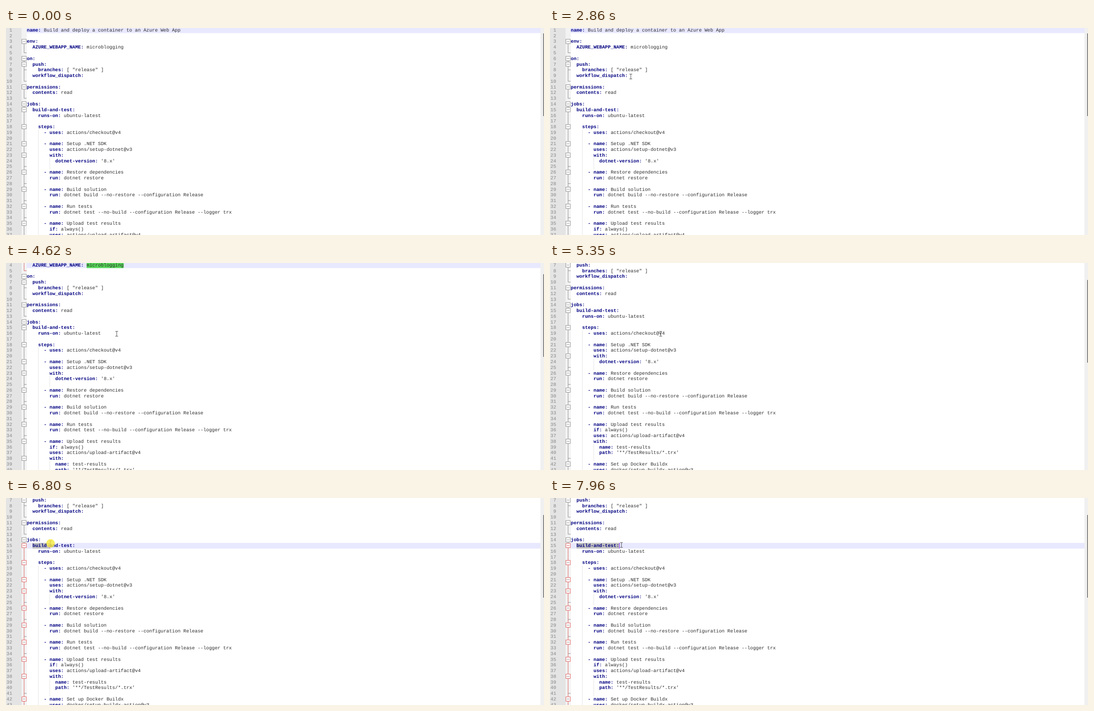
These frames come from a looping animation (1205 px wide and 465 px high, 8 s). An HTML page:

```html
<!DOCTYPE html>
<html lang="en">
<head>
<meta charset="utf-8">
<title>Workflow editor</title>
<style>
  html, body { margin: 0; width: 100%; height: 100%; overflow: hidden; background: #fff; }
  svg { display: block; width: 1205px; height: 465px; }
  text {
    font: 10.64px "Liberation Mono", "Courier New", monospace;
    white-space: pre; text-rendering: geometricPrecision; fill: #2c2c2c;
  }
  .key { font-weight: bold; fill: #000080; }
  .num { fill: #858585; text-anchor: end; }
</style>
</head>
<body>
<svg id="stage" viewBox="0 0 1205 465"></svg>
<script>
const LOOP = 8000, STEP = 70;
const ROW = 12.77, TOP = -1.35, LEFT = 46.5, CHAR = 6.385;
const GREY = '#808080', RED = '#d84a4a', SELECTED = '#c0c0c0', FOUND = '#57d65a';

const LINES = `name: Build and deploy a container to an Azure Web App

env:
  AZURE_WEBAPP_NAME: microblogging

on:
  push:
    branches: [ "release" ]
  workflow_dispatch:

permissions:
  contents: read

jobs:
  build-and-test:
    runs-on: ubuntu-latest

    steps:
      - uses: actions/checkout@v4

      - name: Setup .NET SDK
        uses: actions/setup-dotnet@v3
        with:
          dotnet-version: '8.x'

      - name: Restore dependencies
        run: dotnet restore

      - name: Build solution
        run: dotnet build --no-restore --configuration Release

      - name: Run tests
        run: dotnet test --no-build --configuration Release --logger trx

      - name: Upload test results
        if: always()
        uses: actions/upload-artifact@v4
        with:
          name: test-results
          path: '**/TestResults/*.trx'

      - name: Set up Docker Buildx
        uses: docker/setup-buildx-action@v3`.split('\n');

// Pointer moves: start, end, x, y
const HOME = [1033, 429];
const MOVES = [
  [190, 400, 548, 244],
  [730, 940, 235, 159],
  [2850, 2860, 181, 109],
  [2860, 3430, 222, 43],
  [4160, 4290, 248, 159],
  [5350, 6120, 66, 110],
  [6190, 6330, 62, 105.5],
  [6660, 7220, 148.5, 97],
  [7220, 7560, 160, 105.5]
];

// Indent of each row, counted from 1; a blank row keeps the one above
const level = [0];
LINES.forEach((s, i) => level.push(s ? s.search(/\S/) : level[i]));
const isHead = n => LINES[n - 1] !== '' && level[n + 1] > level[n];

// First and last row of the fold block around a row
function blockOf(row) {
  let head = row;
  while (head && !(isHead(head) && (head === row || level[head] < level[row]))) head--;
  let tail = head;
  while (head && level[tail + 1] > level[head]) tail++;
  return [head, tail];
}

const stage = document.getElementById('stage');
const rowTop = n => TOP + (n - 1) * ROW;
const colX = c => LEFT + c * CHAR;

function set(el, attrs) {
  for (const k in attrs) el.setAttribute(k, attrs[k]);
  return el;
}
function add(parent, tag, attrs, text = '') {
  const el = set(document.createElementNS('http://www.w3.org/2000/svg', tag), attrs);
  el.textContent = text;
  return parent.appendChild(el);
}
const rect = (parent, x, y, width, height, fill) =>
  add(parent, 'rect', { x, y, width, height, fill });
const line = (parent, x1, y1, x2, y2, stroke = GREY) =>
  add(parent, 'line', { x1, y1, x2, y2, stroke, 'stroke-width': 0.9 });
const show = (el, on) => set(el, { visibility: on ? 'visible' : 'hidden' });

rect(stage, 0, 0, 35.2, 465, '#e4e4e4');
rect(stage, 35.2, 0, 11.1, 465, '#f2f2f2');
const doc = add(stage, 'g', {});
const current = rect(doc, 46.3, 0, 1150.7, ROW, '#e8e8ff');
const marks = [0, 1].map(() => rect(doc, 0, 0, 0, ROW, SELECTED));

const foldParts = [];
function drawFold(n) {
  const head = isHead(n), next = level[n + 1] ?? level[n];
  if (!head && !level[n]) return;
  const x = 40.5, top = rowTop(n), mid = top + ROW / 2 - 0.4, gap = head ? 5 : 0;
  const keep = (role, el) => foldParts.push({ n, role, el });
  if (level[n]) keep('above', line(doc, x, top, x, mid - gap));
  if (next) keep('below', line(doc, x, mid + gap, x, top + ROW));
  if (head) {
    keep('box', set(rect(doc, x - 4.9, mid - 4.9, 9.8, 9.8, '#fff'),
      { stroke: GREY, 'stroke-width': 0.9 }));
    keep('side', line(doc, x - 3, mid, x + 3, mid));
  } else if (next < level[n]) {
    keep('side', line(doc, x, mid, 46.3, mid));
  }
}

function drawRow(s, n) {
  const top = rowTop(n), y = top + 9.3;
  for (let c = 4; c < level[n]; c += 4) {
    const x = colX(c) + 0.4;
    set(line(doc, x, top, x, top + ROW, '#c0c0c0'), { 'stroke-dasharray': '0.8 0.8' });
  }
  add(doc, 'text', { x: 13.8, y, class: 'num' }, n);
  drawFold(n);
  const m = s.match(/^\s*((?:- )?[\w-]+:) ?(.*)$/);
  if (!m) return;
  add(doc, 'text', { x: colX(level[n]), y, class: 'key' }, m[1]);
  add(doc, 'text', { x: colX(level[n] + m[1].length + 1), y }, m[2]);
}
LINES.forEach((s, i) => drawRow(s, i + 1));

const caret = rect(doc, 0, 0, 0.9, ROW, '#8000ff');
rect(stage, 1197, 0, 8, 465, '#f0f0f0');
const thumb = set(rect(stage, 1203, 12, 3, 186, '#858585'), { rx: 1 });
const pointer = add(stage, 'path', {
  d: 'M-3-5.5H-1Q0-5.5 0-4.6Q0-5.5 1-5.5H3M0-4.8V4.8M-3 5.5H-1Q0 5.5 0 4.6Q0 5.5 1 5.5H3',
  fill: 'none', stroke: '#333', 'stroke-width': 0.9
});
const halo = add(stage, 'circle', { r: 9.6, fill: '#f6ea3e' });

function pointAt(t) {
  let [x, y] = HOME;
  for (const [start, end, toX, toY] of MOVES) {
    if (t < start) break;
    const past = Math.floor((t - start) / STEP) * STEP;
    const k = t >= end ? 1 : past / (end - start);
    const ease = k * (2 - k);
    x += (toX - x) * ease;
    y += (toY - y) * ease;
  }
  return [x, y];
}

function mark(i, row, from, to, fill = SELECTED) {
  set(marks[i], { x: colX(from), y: rowTop(row), width: (to - from) * CHAR, fill });
}
function putCaret(row, col, on = true) {
  set(caret, { x: colX(col), y: rowTop(row) });
  show(caret, on);
}
function paintFolds(row) {
  const [head, tail] = blockOf(row);
  for (const { n, role, el } of foldParts) {
    const inside = head > 0 && n >= head && n <= tail;
    const hot = inside && !(role === 'above' && n === head) &&
      !(role === 'side' && n !== head && n !== tail);
    set(el, { stroke: hot ? RED : GREY });
  }
}

function draw(t) {
  const scroll = t < 4620 ? 0 : t < 4950 ? 3 : 6;
  const [x, y] = pointAt(t);
  set(doc, { transform: `translate(0 ${-scroll * ROW})` });
  set(thumb, { y: 12 + scroll * 13 / 3 });

  let row = 1;
  mark(0, 1, 0, 0);
  mark(1, 1, 0, 0);
  show(caret, false);
  if (t >= 6660) {
    // Drag selection, anchored before "build-and-test"
    row = Math.floor((y - TOP) / ROW) + 1 + scroll;
    const len = LINES[row - 1].length;
    const col = Math.min(len, Math.max(0, Math.round((x - LEFT) / CHAR)));
    if (row < 15) {
      mark(0, row, col, len + 1);
      mark(1, 15, 0, 2);
    } else {
      mark(0, row, Math.min(2, col), Math.max(2, col));
    }
    putCaret(row, col);
  } else if (t >= 3500) {
    row = 4;
    if (t >= 3700) {
      mark(0, row, 21, 34, t < 3770 ? SELECTED : FOUND);
      putCaret(row, 34, t < 4230);
    }
  }
  set(current, { y: rowTop(row) });
  paintFolds(row);

  const held = t >= 3500 && t < 3900 || t >= 6660 && t < 7960;
  const fading = t >= 3830 && t < 3900 || t >= 7890;
  set(halo, { cx: x, cy: y, opacity: fading ? 0.4 : 0.8 });
  show(halo, held);
  set(pointer, { transform: `translate(${x} ${y})` });
  show(pointer, t >= 190);
}

const begin = performance.now();
function tick() {
  draw((performance.now() - begin) % LOOP);
  requestAnimationFrame(tick);
}
tick();
</script>
</body>
</html>
```
